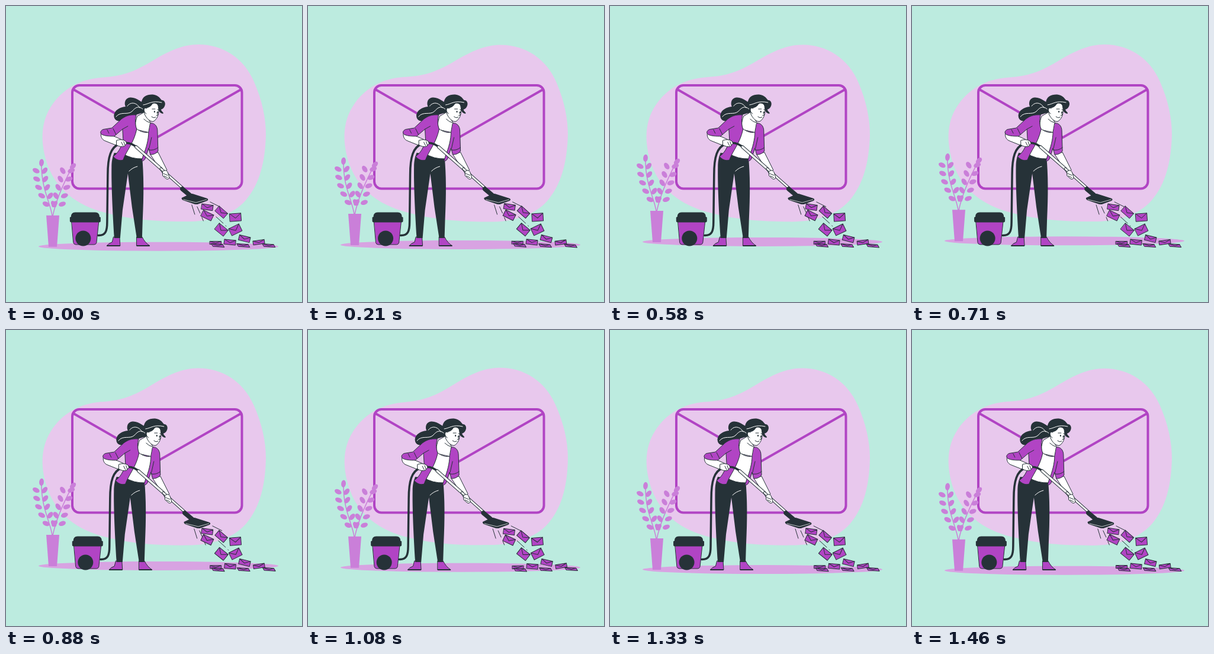
An HTML page that plays this animation: 500 px wide and 500 px high, repeating every 1500 ms.

```html
<!DOCTYPE html>
<html lang="en">
<head>
<meta charset="utf-8">
<title>Inbox cleaning</title>
<style>
  html, body { margin: 0; height: 100%; overflow: hidden; background: #bcebdf; }
  svg { display: block; width: 100%; height: 100%; }
  .dark { fill: #263238; }
  .purple { fill: #b144c4; }
  .skin { fill: #fff; }
  .line { fill: none; stroke: #263238; }
  .shine { fill: none; stroke: #fff; }
  .outlined { stroke: #263238; stroke-linejoin: round; }
  #plant { fill: #ca7fd9; }
  #mails path { fill: #b144c4; stroke: #263238; vector-effect: non-scaling-stroke; stroke-linejoin: round; }
</style>
</head>
<body>
<svg viewBox="0 0 500 500" stroke-linecap="round">
  <path id="blob" fill="#e8c8ed" d="M325 65C366 65 402 88 419 128C433 160 439 190 439 217C438 262 429 300 405 328C382 354 345 364 305 364C255 364 215 361 175 351C130 341 88 318 70 268C58 232 58 198 76 170C95 140 125 124 160 121C190 119 210 115 245 94C275 76 298 65 325 65Z"/>

  <g fill="none" stroke="#b144c4" stroke-width="4">
    <rect x="112" y="134" width="286.500" height="174.500" rx="12"/>
    <path d="M114 141L255 222 397 141"/>
  </g>

  <ellipse class="float" cx="257.500" cy="406.500" rx="202.500" ry="7.500" fill="#d8a3e2"/>
  <g id="plant" class="float">
    <path d="M68 354H90L86 407H72Z"/>
    <path fill="none" stroke="#ca7fd9" stroke-width="1.500" d="M78 355C76 335 59 308 60 266M79 355C84 330 97 300 112 272"/>
  </g>

  <g id="cleaner">
    <!-- vacuum -->
    <path class="purple outlined" d="M111 363H157L153 400Q152 403 149 403H118Q115 403 114 400Z"/>
    <path class="dark" d="M117 348.500H151Q158 348.500 158 356L160 357V363Q160 365.500 157 365.500H111Q108 365.500 108 363V357L110 356Q110 348.500 117 348.500Z"/>
    <circle class="dark" cx="130.500" cy="392.500" r="13"/>

    <!-- legs and shoes -->
    <g class="purple outlined">
      <path d="M182 390H192L193 405H170.500Q173 401 179 399Z"/>
      <path d="M221 390H230Q235 400 243 405H221Z"/>
    </g>
    <path class="line" stroke-width="2" d="M171 405H192M221.500 405H242"/>
    <path class="dark" d="M183 248L230 254C233 285 233 320 231 360L230 392H221L213 340 206 283 197 345 193 392H183C180 345 178 300 178.500 272C178.500 262 180 255 183 248Z"/>
    <path class="shine" d="M208 279Q214 273 222 271"/>

    <!-- hair -->
    <path class="dark" d="M236 164C228 164 222 154 210 154.500C202 155 199 163 202 170C192 171 184 176 182.500 184C182 192 188 196 196 194C204 192 208 187 216 185C224 183 229 180 234 181Z"/>
    <path class="shine" d="M205 169C211 161 221 163 226 172M186 187C194 177 205 185 213 178C219 171 224 168 231 174"/>

    <!-- arms and torso -->
    <g class="skin outlined">
      <path d="M161 213C159 220 162 226 168 228L188 236 196 226 176 217Z"/>
      <path d="M244 250L257 247 272 277 266 284Z"/>
      <path d="M236 178L222 186C218 196 218 204 221 209L243 214 245 198 240 190Z"/>
      <path d="M220 207C228 213 236 215 242 213C241 230 236 245 232 258Q212 259 197 249C206 240 215 226 220 207Z"/>
    </g>
    <path class="line" d="M233 191Q238 196 243 197"/>
    <g class="purple outlined">
      <path d="M220 184C208 183 202 186 195 191L179 206 164 208.500C159 211 159 215 162 217C168 220 176 220 183 220L197 208 198 226C195 240 188 250 181 254C186 260 192 262 198 260C203 245 216 232 221 208C218 200 218 193 220 184Z"/>
      <path d="M244 198C251 197 256 203 256 211L257 245C254 249 250 251 244 251L241 240 236 256Q234 262 229 262L232 252C237 240 241 225 241 213Z"/>
    </g>
    <path class="line" d="M181 207L186 217M197 208L206 203M242 240L246 222M241 243Q250 245 257 239M171 209L174 215"/>

    <!-- head -->
    <path class="skin outlined" d="M235 167L234 182C237 190 244 196 249 195C255 192 259 183 258 174L256 161 242 160Z"/>
    <path class="dark" d="M229 164C229 153 239 149 248 149.500C256 150 260 155 263 159C268 159 270 164 268.500 168C267 173 264 174 262 175C263 179 267 179 265.500 182C260 181 257 177 258 172C258 167 253 163 248 165C244 171 240 172 236 173C233 172 230 168 229 164Z"/>
    <path class="shine" d="M232 167C241 166 246 159 263 163"/>
    <path class="skin outlined" d="M238 173C233 170 231 178 237 182"/>
    <path class="line" d="M247 174L252 174M256 175L258 176M246 187Q249 190 253 188M255 180L257 184 254 185"/>
    <path class="line" stroke-width="2" d="M251 178V179M256.500 179V180"/>

    <!-- hose, pipe and nozzle -->
    <path class="line" stroke-width="3.500" d="M156 387.500C168 388 171 381 171 365L172 285C172 255 177 238 192 233C205 229 214 232 222 240"/>
    <path class="line" stroke-width="5.500" d="M220 238L262 275"/>
    <path class="shine" stroke-width="3.500" d="M220 238L262 275"/>
    <path class="line" stroke-width="4.800" d="M262 275L298 307"/>
    <path class="shine" stroke-width="2.800" d="M262 275L298 307"/>
    <path class="line" stroke-width="7.500" d="M298 309L310 319"/>
    <path class="dark" d="M297 324L311 317.500Q314 316.500 318 318L340 325Q343 327 340 329L325 334.500Q322 335.500 318 334.500L299 328Q296 326 297 324Z"/>
    <path class="shine" stroke-width=".7" d="M300 327L321 332 339 327"/>
    <g class="skin outlined">
      <path d="M187 227Q195 224 202 228L204 232 200 237Q194 239 187 235Z"/>
      <path d="M265 279Q270 276 273 280L276 289Q275 294 271 292L265 287Z"/>
    </g>
    <path class="line" d="M195 230L198 236M199 229L201 235M266 283L273 286M267 287L273 290"/>

    <path class="line" d="M345 331L361 339M314 336L319 352M323 339L328 350M331 357L333.500 363M355 356L367 367M371 371L372 372"/>
  </g>

  <g id="mails"></g>
</svg>
<script>
const LOOP = 1500, STEPS = 36;
const $ = id => document.getElementById(id);
const floaters = document.querySelectorAll('.float');

function addLeaf(x, y, tilt) {
  $('plant').innerHTML +=
    `<ellipse rx="6.200" ry="3.900" transform="translate(${x} ${y}) rotate(${tilt})"/>`;
}

function addMail(x, y, width, height, tilt, slant = 0) {
  $('mails').innerHTML += `<path d="M-.5-.5H.5V.5H-.5ZM.5-.5L0 .1-.5-.5"
    transform="translate(${x} ${y}) rotate(${tilt}) skewX(${slant}) scale(${width} ${height})"/>`;
}

// Each stem has a tip leaf and five pairs below it
const stems = [
  { tip: [60, 265, -85], lean: -12, x: k => 58 + 1.05 * k * k },
  { tip: [113, 271, -45], lean: 18, x: k => 103 - 3.8 * k }
];
for (const { tip, lean, x } of stems) {
  addLeaf(...tip);
  for (let k = 0; k < 5; k++)
    for (const side of [-1, 1]) addLeaf(x(k) + side * 7.2, 278.5 + 14.1 * k, lean - side * 38);
}

// Two rows of flying mail
for (let row = 0; row < 2; row++)
  for (let col = 0; col < 3; col++) {
    const y = row ? 354 + 24 * Math.min(col, 1) : 340 + 8.5 * col;
    const tilt = 17 + 62 * col - 39 * col * col + (row ? 1 : -1) * (9 - 10 * col);
    addMail(340 + 23.8 * col, y, 19, Math.min(13, 9 + 2 * (col + row)), tilt);
  }

// The heap: a top layer with one peak, and flat mail on the floor
for (let i = 0; i < 4; i++) {
  const peak = 7 * Math.exp(-2 * (i - 2) ** 2);
  addMail(354 + 24.4 * i, 400 - peak, 19, 5 + 4 * Math.sin(.9 * i), 14 * Math.sin(.42 * i * i));
}
for (let i = 0; i < 3; i++) addMail(358 + 43 * i, 404.5, 19, 4.5, 4, 35);

// Linear interpolation through evenly spaced values
function track(values, p) {
  const at = p * (values.length - 1), i = Math.floor(at);
  return values[i] + (values[i + 1] - values[i]) * (at - i);
}
const shake = [0, -1, 2, -4, 4, -4, 4, -4, 2, -1, 0];
const float = [0, -10, 0];
const wind = [0, 1, 0, -1, 0];

function draw(now) {
  const step = Math.floor((now + 5) % LOOP / LOOP * STEPS);
  const p = (step + .5) / STEPS;
  const angle = track(wind, p);
  $('blob').setAttribute('transform', `rotate(${angle} 250 215)`);
  $('mails').setAttribute('transform', `rotate(${angle} 398 370)`);
  $('cleaner').setAttribute('transform', `translate(${track(shake, p)})`);
  floaters.forEach(el => el.setAttribute('transform', `translate(0 ${track(float, p)})`));
}

const start = performance.now();
function tick() {
  draw(performance.now() - start);
  requestAnimationFrame(tick);
}
tick();
</script>
</body>
</html>
```
